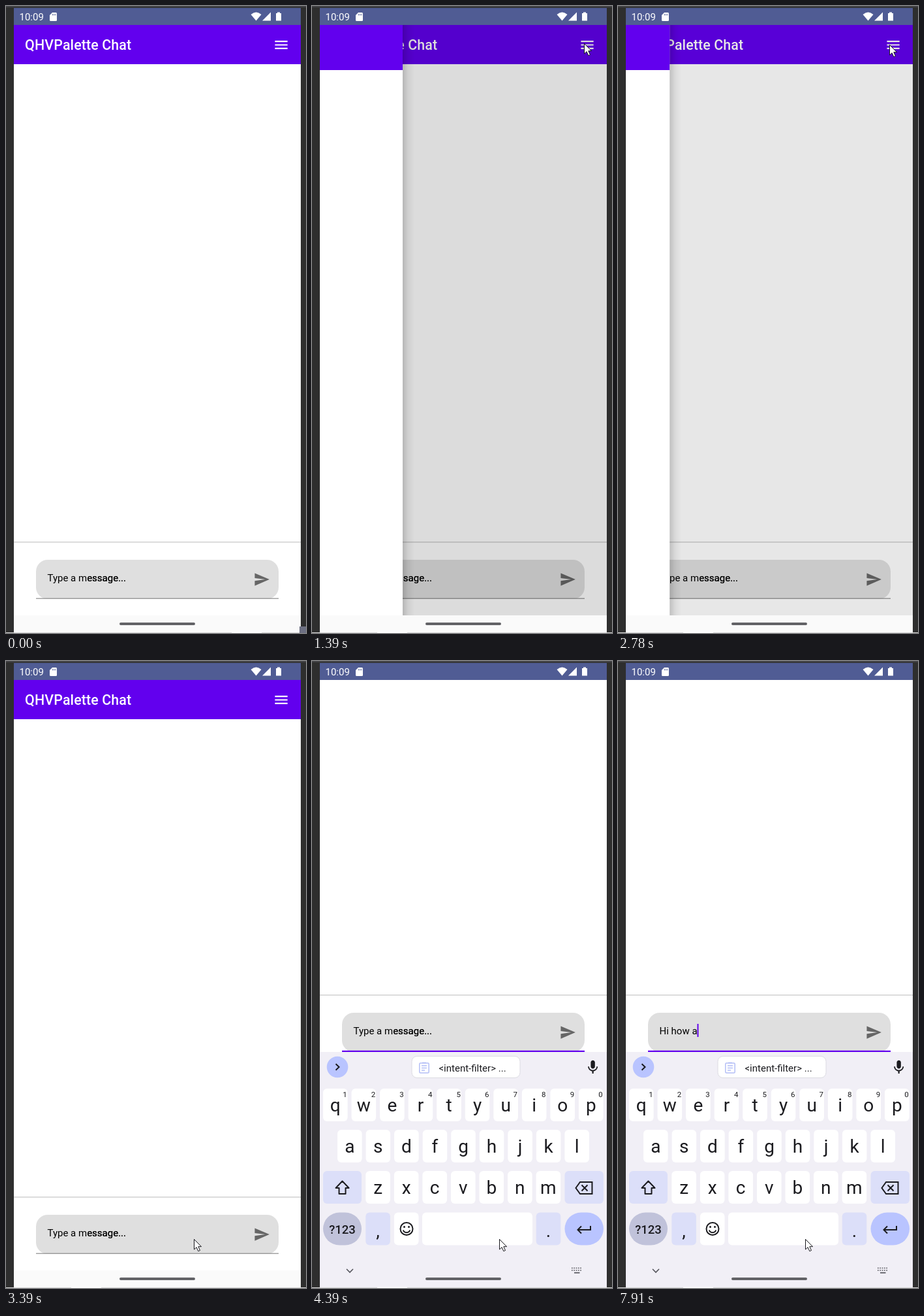
Recreate the animation shown at these times as an HTML page. Size 460 px wide and 959 px high, loop 8 s.

```html
<!DOCTYPE html>
<html lang="en">
<head>
<meta charset="utf-8">
<title>Chat screen</title>
<style>
@property --open { syntax: "<number>"; inherits: true; initial-value: 0; }
@property --kb { syntax: "<number>"; inherits: true; initial-value: 0; }
@property --typed { syntax: "<length>"; inherits: true; initial-value: 0px; }

html, body { margin: 0; width: 100%; height: 100%; overflow: hidden; background: #2e2e2e; }
svg { display: block; width: 460px; height: 959px; font-family: Roboto, sans-serif; }

svg {
  animation: drawer 8s step-end infinite, keyboard 8s step-end infinite, typing 8s step-end infinite;
}
.app { transform: translateY(calc(var(--kb) * -309px)); }
.scrim { opacity: var(--open); }
.drawer { transform: translateX(calc((var(--open) - 1) * 440px)); }
.keyboard { transform: translateY(calc((1 - var(--kb)) * 362px)); }
.typed { transform: translateX(var(--typed)); }

.pointer { animation: pointer 8s step-end infinite; }
.caret { animation: blink 8s step-end infinite; }
.hint { animation: hint 8s step-end infinite; }
.focus { animation: focus 8s step-end infinite; }
.compose { animation: compose 8s step-end infinite; }
.corner { animation: corner 8s step-end infinite; }
.edge { animation: edge 8s step-end infinite; }

/* 1% = 80 ms */
@keyframes drawer {
  0% { --open: 0; }
  16.625% { --open: .045; }
  17.375% { --open: .425; }
  18.25% { --open: .832; }
  19.125% { --open: .972; }
  19.875% { --open: 1; }
  33.25% { --open: .994; }
  34% { --open: .758; }
  34.75% { --open: .289; }
  35.625% { --open: .072; }
  36.375%, 100% { --open: 0; }
}
@keyframes keyboard {
  0% { --kb: 0; }
  47.375% { --kb: .1; }
  48.25% { --kb: .45; }
  49% { --kb: .8; }
  49.875% { --kb: .96; }
  50.75%, 100% { --kb: 1; }
}
@keyframes typing {
  0% { --typed: 0px; }
  68.25% { --typed: 10.7px; }
  73.125% { --typed: 14.3px; }
  73.875% { --typed: 18px; }
  81.375% { --typed: 26.3px; }
  83.125% { --typed: 34.9px; }
  94.75% { --typed: 46.2px; }
  97.25% { --typed: 49.9px; }
  98.875%, 100% { --typed: 58px; }
}
@keyframes blink {
  0% { opacity: 0; }
  45% { opacity: 1; }
  51.6% { opacity: 0; }
  58.25% { opacity: 1; }
  64.875% { opacity: 0; }
  68.25% { opacity: 1; }
  80.625% { opacity: 0; }
  81.375% { opacity: 1; }
  89.75% { opacity: 0; }
  94.75%, 100% { opacity: 1; }
}
@keyframes hint { 0% { opacity: 1; } 68.25%, 100% { opacity: 0; } }
@keyframes focus { 0% { opacity: 0; } 45%, 100% { opacity: 1; } }
@keyframes compose { 0% { opacity: 0; } 86.375% { opacity: 1; } 94.75%, 100% { opacity: 0; } }
@keyframes corner { 0% { opacity: 1; } .875%, 100% { opacity: 0; } }
@keyframes edge { 0% { transform: none; } 15%, 100% { transform: translateX(-246px); } }
@keyframes pointer {
  0% { transform: translate(462px, 960px); }
  4.125% { transform: translate(462px, 960px); animation-timing-function: steps(8, start); }
  10.775% { transform: translate(428px, 250px); animation-timing-function: steps(5, start); }
  14.93% { transform: translate(417px, 57px); }
  31.5% { transform: translate(416px, 59px); }
  37.25% { transform: translate(412px, 82px); }
  38.125% { transform: translate(402px, 120px); }
  39% { transform: translate(375px, 320px); }
  39.875% { transform: translate(315px, 650px); }
  40.75% { transform: translate(288px, 853px); }
  41.625% { transform: translate(288px, 873px); }
  42.375% { transform: translate(288px, 884px); }
  54.875%, 100% { transform: translate(287px, 884px); }
}
</style>
</head>
<body>
<svg viewBox="0 0 460 959">
  <defs>
    <clipPath id="content"><path d="M12 29H452V932H12z"/></clipPath>
    <clipPath id="screen"><path d="M12 29H452V958H12z"/></clipPath>
    <linearGradient id="shade">
      <stop offset="0" stop-opacity=".17"/>
      <stop offset=".45" stop-opacity=".06"/>
      <stop offset="1" stop-opacity="0"/>
    </linearGradient>
  </defs>

  <rect width="460" height="959" fill="#2e2e2e"/>
  <rect width="460" height="2" fill="#424245"/>

  <g clip-path="url(#content)">
    <rect x="12" y="29" width="440" height="903" fill="#fff"/>
    <g class="app">
      <rect x="12" y="29" width="440" height="60" fill="#6200ee"/>
      <text x="29.1" y="67" font-size="21.4" font-weight="500" fill="#fff" letter-spacing=".1">QHVPalette Chat</text>
      <path transform="translate(409.2 46.7) scale(1.07)" fill="#fff" d="M3 18h18v-2H3v2zm0-5h18v-2H3v2zm0-7v2h18V6H3z"/>
      <rect x="12" y="819" width="440" height="2" fill="#dcdcdc"/>
      <rect x="46" y="847" width="372" height="60" rx="18" fill="#dfdfdf"/>
      <rect x="46" y="905.6" width="372" height="1.2" fill="#8c8c8c"/>
      <rect class="focus" x="46" y="904.8" width="372" height="2.2" fill="#6200ee"/>
      <text class="hint" x="63.5" y="880" font-size="15">Type a message...</text>
      <text x="63.5" y="880" font-size="15">Hi how a</text>
      <rect class="compose" x="81.3" y="881.2" width="17" height="1.2"/>
      <g class="typed">
        <rect x="63.5" y="862" width="62" height="24" fill="#dfdfdf" class="cover"/>
        <rect class="caret" x="63.5" y="864" width="2" height="20" fill="#6200ee"/>
      </g>
      <text class="hint" x="63.5" y="880" font-size="15">Type a message...</text>
      <path transform="translate(379.3 864.2) scale(1.07)" fill="#666" d="M2.01 21L23 12 2.01 3 2 10l15 2-15 2z"/>
    </g>
    <rect class="scrim" x="12" y="29" width="440" height="903" fill-opacity=".32"/>
    <g class="drawer">
      <rect x="392" y="29" width="18" height="903" fill="url(#shade)"/>
      <rect x="12" y="29" width="380" height="903" fill="#fff"/>
      <rect x="12" y="29" width="380" height="69" fill="#6200ee"/>
      <text x="29.1" y="73" font-size="25.7" font-weight="700" fill="#fff" letter-spacing=".55">Main Menu</text>
      <g id="menu" font-size="17.1" letter-spacing=".27" fill="#1c1c20">
        <text x="88" y="134">Profile</text>
        <text x="88" y="194">Image Generator</text>
        <text x="88" y="254">Chat Bot</text>
        <text x="88" y="314">Logout</text>
      </g>
      <path d="M38.2 136.4L42 139.4L45.8 136.4z"/>
      <circle cx="42" cy="127" r="10.2"/>
      <circle cx="42" cy="123" r="3.1" fill="#fff"/>
      <path fill="#fff" d="M35.6 130.8c.2-2.1 4.200-3.300 6.400-3.300s6.200 1.200 6.400 3.300a7.700 7.700 0 0 1-12.800 0z"/>
      <path transform="translate(29.1 174.800) scale(1.07)" d="M21 19V5c0-1.100-.9-2-2-2H5c-1.100 0-2 .9-2 2v14c0 1.100.9 2 2 2h14c1.100 0 2-.9 2-2zM8.500 13.500l2.500 3.010L14.500 12l4.500 6H5l3.500-4.500z"/>
      <path transform="translate(29.1 234.500) scale(1.07)" d="M20 2H4c-1.100 0-2 .9-2 2v18l4-4h14c1.100 0 2-.9 2-2V4c0-1.100-.9-2-2-2z"/>
      <path transform="translate(29.1 294.800) scale(1.07)" d="M20 11H7.830l5.590-5.590L12 4l-8 8 8 8 1.410-1.410L7.830 13H20v-2z"/>
    </g>
  </g>

  <rect x="12" y="932" width="440" height="26" fill="#fafafa"/>

  <g clip-path="url(#screen)">
    <g class="keyboard" fill="#1b1b1f">
      <rect x="12" y="598" width="440" height="362" fill="#f1eff6"/>
      <circle cx="39" cy="621" r="16.300" fill="#b9c4ff"/>
      <path d="M36.500 616.200l5 4.800-5 4.800" fill="none" stroke="#1b1b1f" stroke-width="2"/>
      <rect x="153" y="604.500" width="166" height="33" rx="8" fill="#fff" stroke="#dcdbe2"/>
      <g fill="none" stroke="#b4bff6" stroke-width="1.500">
        <rect x="164.800" y="615" width="14.400" height="15" rx="1.500"/>
        <path d="M168 619h8M168 622.500h8M168 626h5M169 614.500h6" />
      </g>
      <text x="194.500" y="628" font-size="15">&lt;intent-filter&gt; ...</text>
      <path transform="translate(417.800 608.500) scale(1.07)" d="M12 14c1.660 0 2.990-1.340 2.990-3L15 5c0-1.660-1.340-3-3-3S9 3.340 9 5v6c0 1.660 1.340 3 3 3zm5.300-3c0 3-2.540 5.100-5.300 5.100S6.700 14 6.700 11H5c0 3.410 2.720 6.230 6 6.720V21h2v-3.280c3.280-.480 6-3.300 6-6.720h-1.700z"/>
      <g id="keys"></g>
      <text x="46.500" y="876" font-size="18.500" font-weight="500" text-anchor="middle">?123</text>
      <g fill="none" stroke="#1b1b1f" stroke-width="2">
        <path d="M46.500 795.500L56.500 806H51.500V815H41.500V806H36.500z" stroke-linejoin="round"/>
        <path d="M404.500 806l6.500-9h18.500v18h-18.500zM413.500 801.500l9 9m0-9l-9 9"/>
        <path d="M427 864v6h-19M413 864.500l-5.500 5.500 5.500 5.500"/>
        <circle cx="145" cy="868.500" r="9.500"/>
        <path d="M139.800 870.500a5.500 5.500 0 0 0 10.400 0"/>
        <path d="M53 930l5 5 5-5" stroke="#55555c" stroke-width="1.600"/>
      </g>
      <circle cx="141.500" cy="865.500" r="1.500"/>
      <circle cx="148.500" cy="865.500" r="1.500"/>
      <g stroke="#55555c" stroke-width="1.700" stroke-dasharray="1.700 1.600" fill="none">
        <path d="M398 928.500h16.500M398 932h16.500"/>
        <path d="M402 935.700h8.500" stroke-dasharray="none"/>
      </g>
    </g>
  </g>
  <rect x="174" y="943" width="116" height="4" rx="2" fill="#626266"/>

  <rect x="12" y="3" width="440" height="26" fill="#505c94"/>
  <g fill="#fff">
    <text x="20.500" y="22" font-size="15">10:09</text>
    <path d="M71 10h5.500a1.500 1.500 0 0 1 1.500 1.500v10a1.500 1.500 0 0 1-1.500 1.500h-8a1.500 1.500 0 0 1-1.500-1.500v-7.500z"/>
    <path d="M375.500 13q8-7 16 0l-8 9.500z"/>
    <path d="M406 9.500v13h-13z"/>
    <path d="M416 9.500h4v1.500h2v11.500h-8v-11.500h2z"/>
  </g>
  <path d="M71.500 12v2.500M73.700 12v2.500M75.900 12v2.500" stroke="#505c94" stroke-width=".9"/>

  <rect y="958" width="460" height="1" fill="#d9d9d9"/>
  <rect class="edge" x="346" y="957.500" width="46" height="1.500" fill="#fff"/>
  <rect class="corner" x="450" y="949" width="10" height="10" fill="#6c6f82"/>

  <path class="pointer" d="M.5.5V16l3.600-3.300 2.700 6 2.700-1.200-2.700-5.800H11.500z" fill="#fff" stroke="#17171c"/>
</svg>
<script>
const pitch = 43.55;
const white = "#fff", soft = "#dcdff9";
const parts = [];

function key(x, y, w, fill, label = "", rx = 6, base = 35) {
  parts.push(`<rect x="${x}" y="${y}" width="${w}" height="50" rx="${rx}" fill="${fill}"/>`);
  if (label) parts.push(`<text x="${x + w / 2}" y="${y + base}" font-size="28" text-anchor="middle">${label}</text>`);
}
function row(letters, x, y) {
  [...letters].forEach((c, i) => key(x + i * pitch, y, 37.6, white, c));
}

row("qwertyuiop", 17, 654);
[..."1234567890"].forEach((d, i) =>
  parts.push(`<text x="${50.5 + i * pitch}" y="667" font-size="11.5" text-anchor="middle">${d}</text>`));
row("asdfghjkl", 39, 717);
row("zxcvbnm", 82.3, 780);
key(17, 780, 59, soft);
key(387.5, 780, 59.5, soft);
key(17, 843.5, 59, "#c0c2da", "", 25);
key(82.3, 843.5, 37.6, soft, ",", 6, 37);
key(125.9, 843.5, 37.6, white);
key(169, 843.5, 169, white);
key(343.7, 843.5, 37.6, soft, ".", 6, 37);
key(387.5, 843.5, 59.5, "#b9c4ff", "", 25);
document.getElementById("keys").innerHTML = parts.join("");
</script>
</body>
</html>
```
